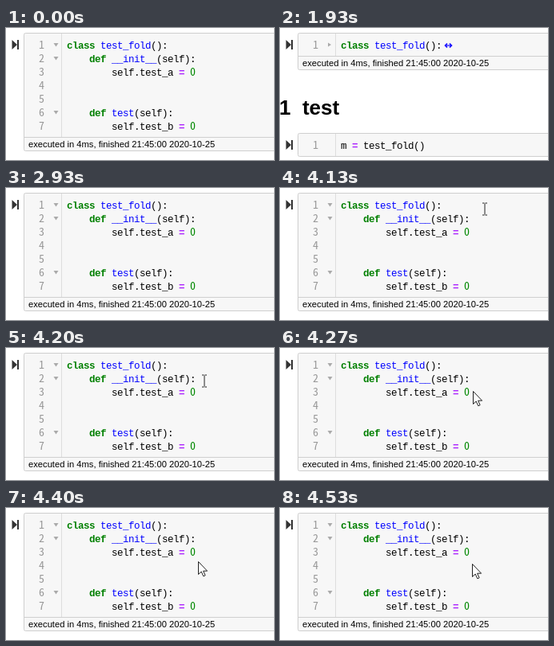
Animation, 335 px wide and 166 px high, one loop 4.59 s. Source, as an HTML page:

```html
<!DOCTYPE html>
<html lang="en">
<head>
<meta charset="utf-8">
<title>Code folding</title>
<style>
  html, body { margin: 0; width: 100%; height: 100%; overflow: hidden; background: #fff; }
  svg { display: block; width: 100%; height: 100%; }
  text { white-space: pre; }
  .code { font: 12.5px "Liberation Mono", monospace; letter-spacing: -.5px; }
  .kw { fill: #008000; font-weight: bold; }
  .def { fill: #00f; }
  .op { fill: #a2f; font-weight: bold; }
  .num, .line { font: 14px "Noto Sans Mono CJK SC", monospace; letter-spacing: 0; }
  .num { fill: #080; }
  .line { fill: #999; }
  .time { font: 11.2px "Liberation Sans", Arial, sans-serif; }
  .head { font: bold 26px "Liberation Sans", Arial, sans-serif; }
</style>
</head>
<body>
<svg id="stage" viewBox="0 0 335 166"></svg>
<script>
const LOOP = 4590, FOLD = 1930, UNFOLD = 2930;
const LINE = 17;
const stage = document.getElementById('stage');

const span = (cls, s) => `<tspan class="${cls}">${s}</tspan>`;
const kw = s => span('kw', s), def = s => span('def', s);
const assign = (name, value) => `${name} ${span('op', '=')} ${value}`;
const zero = span('num', '0');

const title = `${kw('class')} ${def('test_fold')}():`;
const method = name => `    ${kw('def')} ${def(name)}(self):`;
const field = name => '        ' + assign('self.' + name, zero);

// Each row: markup, fold marker
const openRows = [
  [title, 'open'],
  [method('__init__'), 'open'],
  [field('test_a')],
  [''],
  [''],
  [method('test'), 'open'],
  [field('test_b')]
];
const foldedRows = [[title, 'closed']];
const callRows = [[assign('m', 'test_fold()')]];

function marker(kind, y) {
  const d = kind === 'open' ? `M59.5 ${y - 2}h6l-3 4.5z` : `M60 ${y - 2.5}v5l4-2.5z`;
  return `<path d="${d}" fill="#aaa"/>`;
}

function row([markup, fold], i, top) {
  const y = top + 14.5 + i * LINE;
  return `<text class="code line" x="41" y="${y + 5}">${i + 1}</text>` +
    `<text class="code" x="76" y="${y + 5}">${markup}</text>` +
    (fold ? marker(fold, y) : '');
}

function cell(top, rows, timed) {
  const code = 12 + LINE * rows.length;
  const height = code + (timed ? 17 : 0);
  const y = top + 14.5;
  return `<rect x="22.5" y="${top}" width="330" height="${height}" rx="2" fill="#f7f7f7" stroke="#cfcfcf"/>` +
    `<path d="M69.5 ${top + .5}v${code - 1}" stroke="#ddd"/>` +
    `<path d="M7.5 ${y - 6}l6.5 6-6.5 6z" fill="#333"/><path d="M15 ${y - 6}v12" stroke="#333" stroke-width="2"/>` +
    rows.map((r, i) => row(r, i, top)).join('') +
    (timed ? `<path d="M23 ${top + code}H335" stroke="#cfcfcf"/>` +
      `<text class="time" x="28" y="${top + code + 12.5}">executed in 4ms, finished 21:45:00 2020-10-25</text>` : '');
}

const arrowLine = 'M206 22h9M209 19.5l-2.5 2.5 2.5 2.5M212 19.5l2.5 2.5-2.5 2.5';
const foldArrow = `<path d="${arrowLine}" fill="none" stroke="#b9f" stroke-width="2.6" opacity=".5"/>` +
  `<path d="${arrowLine}" fill="none" stroke="#00f" stroke-width="1.2"/>`;

stage.innerHTML =
  `<g id="open">${cell(6.5, openRows, true)}</g>` +
  `<g id="folded">${cell(6.5, foldedRows, true)}${foldArrow}` +
  `<text class="head" x="-1" y="109">1\u00a0\u00a0test</text>${cell(132.5, callRows, false)}</g>` +
  '<path id="beam" d="M-3-7.5h2.5M.5-7.5h2.5M0-7v14M-3 7.5h2.5M.5 7.5h2.5" fill="none" stroke="#222"/>' +
  '<path id="arrow" d="M.5.5v16l3.7-3.5 2.6 5.8 2.3-1-2.5-5.6h5z" fill="#fff" stroke="#222"/>';

const [open, folded, beam, arrow] =
  ['open', 'folded', 'beam', 'arrow'].map(id => document.getElementById(id));

// Pointer samples: time, shape, x, y
const pointer = [
  [4130, beam, 256, 26.5],
  [4200, beam, 248, 41.5],
  [4270, arrow, 241, 54],
  [4330, arrow, 240, 61],
  [4400, arrow, 240, 67],
  [4530, arrow, 240, 70]
];

const show = (el, on) => el.setAttribute('visibility', on ? 'visible' : 'hidden');

function draw(t) {
  const isFolded = t >= FOLD && t < UNFOLD;
  show(open, !isFolded);
  show(folded, isFolded);
  const at = pointer.filter(p => t >= p[0]).pop();
  for (const el of [beam, arrow]) show(el, at && at[1] === el);
  if (at) at[1].setAttribute('transform', `translate(${at[2]} ${at[3]})`);
}

const start = performance.now();
function tick() {
  draw((performance.now() - start) % LOOP);
  requestAnimationFrame(tick);
}
draw(0);
requestAnimationFrame(tick);
</script>
</body>
</html>
```
